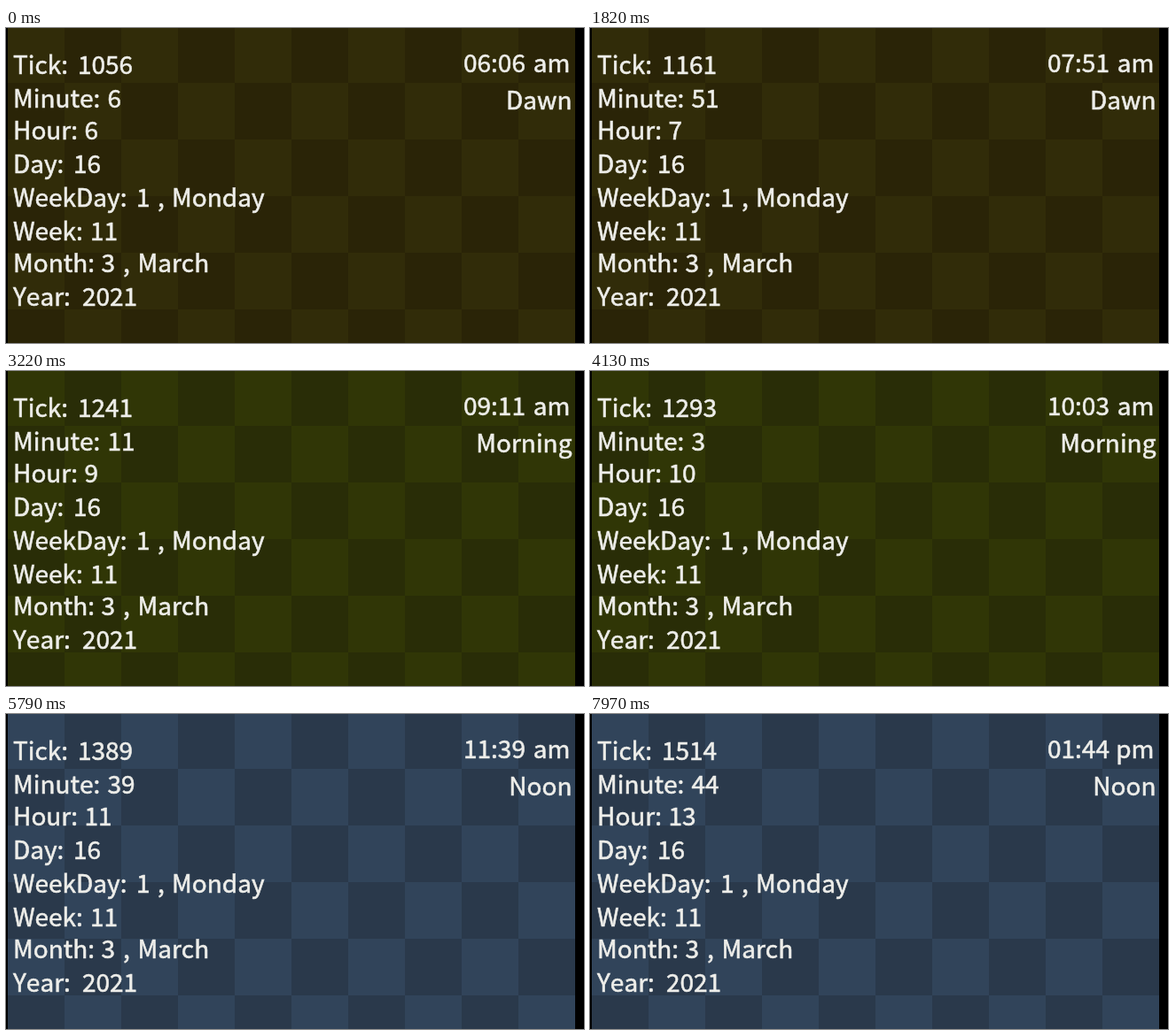
Animation, 652 px wide and 356 px high, one loop 8000 ms. Source, as an HTML page:

```html
<!DOCTYPE html>
<html lang="en">
<head>
<meta charset="utf-8">
<title>Game clock</title>
<style>
  html, body { margin: 0; width: 100%; height: 100%; overflow: hidden; background: #000; }
  svg { display: block; width: 652px; height: 356px; }
  text {
    font: 28px "Noto Sans CJK JP", "Noto Sans CJK", "Noto Sans", sans-serif;
    font-kerning: none;
    fill: #eeeeea;
    stroke: #eeeeea;
    stroke-width: 0.6px;
    white-space: pre;
  }
</style>
</head>
<body>
<svg viewBox="0 0 652 356">
  <defs>
    <pattern id="checks" x="2" y="-2" width="128" height="128" patternUnits="userSpaceOnUse">
      <rect id="dark" width="128" height="128"/>
      <path id="light" d="M0 0h64v128h64v-64h-128z"/>
    </pattern>
  </defs>
  <rect x="2" width="640" height="356" fill="url(#checks)" shape-rendering="crispEdges"/>
</svg>
<script>
const LOOP = 8000;
const START_TICK = 1056;
const TICKS_PER_MS = 0.0575;
const MIDNIGHT_TICK = 690;

const svg = document.querySelector('svg');
const dark = document.getElementById('dark');
const light = document.getElementById('light');

const phases = [
  { from: 0, name: 'Dawn', dark: '#2a2407', light: '#312c09' },
  { from: 8, name: 'Morning', dark: '#292d07', light: '#303606' },
  { from: 11, name: 'Noon', dark: '#2a394b', light: '#31445a' }
];

function addText(x, y, content = '', anchor = 'start') {
  const node = document.createElementNS('http://www.w3.org/2000/svg', 'text');
  node.setAttribute('x', x);
  node.setAttribute('y', y);
  node.setAttribute('text-anchor', anchor);
  node.textContent = content;
  svg.append(node);
  return node;
}

// label, baseline, value position, fixed value
const rows = [
  ['Tick', 52, 81],
  ['Minute', 90, 114.5],
  ['Hour', 126, 88.5],
  ['Day', 164, 76, '16'],
  ['WeekDay', 202, 147, '1'],
  ['Week', 240, 95, '11'],
  ['Month', 276, 107.5, '3'],
  ['Year', 314, 86, '2021']
];
const [tickText, minuteText, hourText] = rows.map(([label, y, x, value]) => {
  addText(8, y, label + ':');
  return addText(x, y, value);
});
addText(171, 202, ',');
addText(187, 202, 'Monday');
addText(132, 276, ',');
addText(148.5, 276, 'March');

const clockText = addText(516, 50);
const halfText = addText(636.5, 50, '', 'end');
const phaseText = addText(638.5, 92, '', 'end');

// The display refreshes every 70 ms, with three uneven steps.
const stamps = [];
for (let t = 0; t < LOOP;) {
  stamps.push(t);
  t += { 4620: 80, 5120: 40, 5860: 80 }[t] || 70;
}

const pad = n => String(n).padStart(2, '0');
let shown = -1;

function draw(now) {
  const time = now % LOOP;
  const stamp = stamps.findLast(t => t <= time);
  if (stamp === shown) return;
  shown = stamp;
  const tick = START_TICK + Math.round(stamp * TICKS_PER_MS);
  const minutes = tick - MIDNIGHT_TICK;
  const hour = Math.floor(minutes / 60);
  const minute = minutes % 60;
  const phase = phases.findLast(p => hour >= p.from);
  tickText.textContent = tick;
  minuteText.textContent = minute;
  hourText.textContent = hour;
  clockText.textContent = pad(hour % 12 || 12) + ':' + pad(minute);
  halfText.textContent = hour < 12 ? 'am' : 'pm';
  phaseText.textContent = phase.name;
  dark.setAttribute('fill', phase.dark);
  light.setAttribute('fill', phase.light);
}

const begin = performance.now();
function loop() {
  draw(performance.now() - begin);
  requestAnimationFrame(loop);
}
loop();
</script>
</body>
</html>
```
